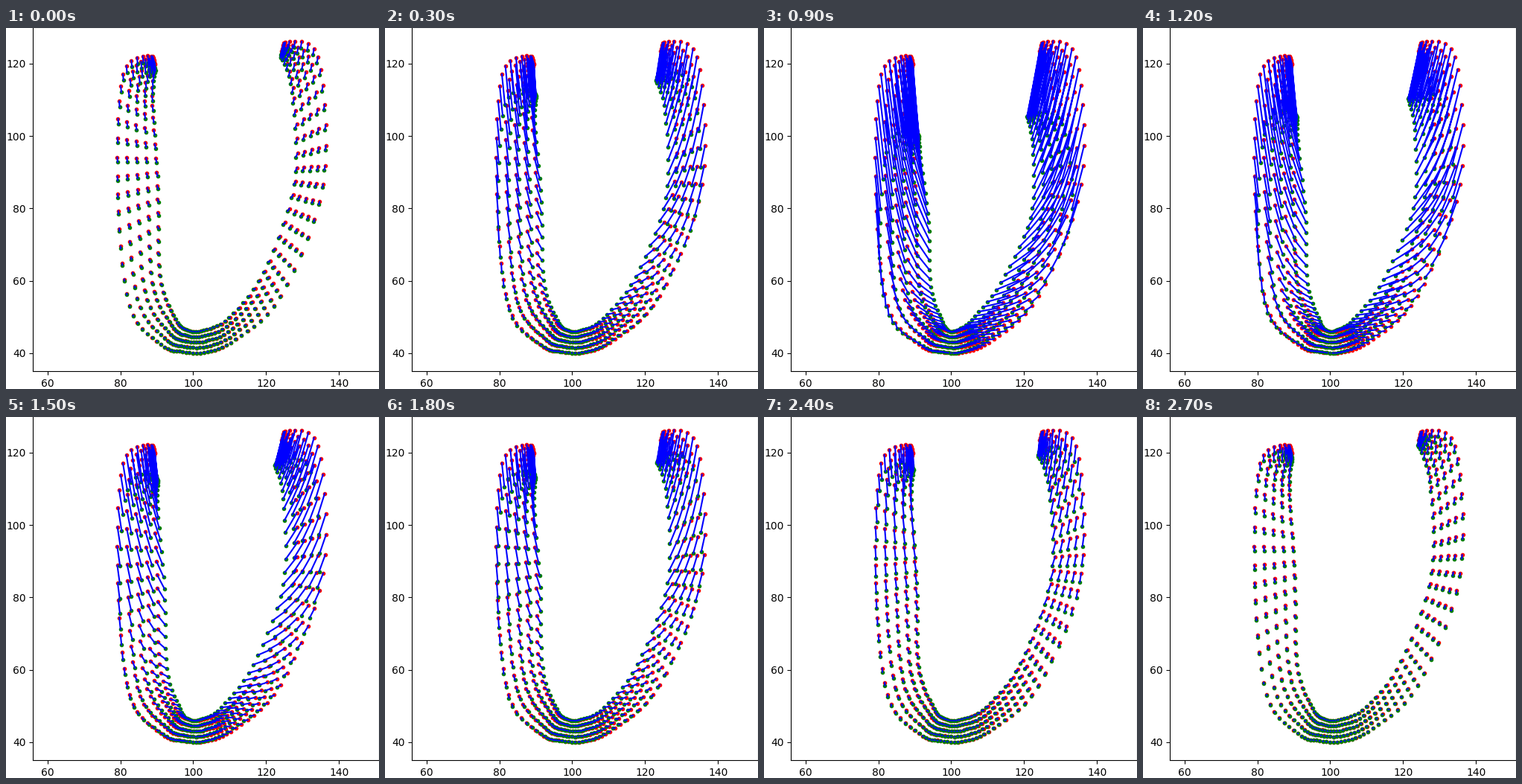
A matplotlib script that plays this animation: 501x485 px, repeating every 2850 ms.

```python
import numpy as np
import matplotlib.pyplot as plt
from matplotlib.animation import FuncAnimation

W, H, DPI = 501, 485, 100
FRAMES, INTERVAL = 19, 150
LAYERS, COLUMNS, APEX = 5, 78, 38
LEFT, BOTTOM, WIDTH, HEIGHT = 36.1, 23.75, 465, 462  # axes box in pixels
XLIM, YLIM = (56, 151), (35, 130)


def spline(knots, values, at):
    """Smooth curve through the values that comes to rest at both ends."""
    knots, values = np.asarray(knots, float), np.asarray(values, float)
    slopes = np.gradient(values, knots, axis=0)
    slopes[[0, -1]] = 0
    at = np.atleast_1d(at)
    k = np.clip(np.searchsorted(knots, at, side="right") - 1, 0, len(knots) - 2)
    step = (knots[k + 1] - knots[k])[:, None]
    u = (at - knots[k])[:, None] / step
    return ((1 + 2 * u) * (1 - u) ** 2 * values[k]
            + u * (1 - u) ** 2 * step * slopes[k]
            + u ** 2 * (3 - 2 * u) * values[k + 1]
            + u ** 2 * (u - 1) * step * slopes[k + 1])


def contour(points):
    """Columns along a contour given by evenly spaced key points."""
    return spline(np.linspace(0, COLUMNS - 1, len(points)), points, np.arange(COLUMNS))


def pull(u, drift, bulge, ripple, drop, middle, softness):
    """Shift at full contraction; u runs from 0 at the apex to 1 at the tip."""
    dx = drift * u + bulge * np.sin(np.pi * u) + ripple * np.sin(3 * np.pi * u)
    dy = drop / (1 + np.exp((middle - u) / softness))
    return np.column_stack([dx, dy])


def through_wall(outer, inner):
    """Evenly spaced layers from the outer to the inner contour."""
    depth = np.linspace(0, 1, LAYERS)[:, None, None]
    return ((1 - depth) * outer + depth * inner).reshape(-1, 2)


def to_data(pixels):
    x = XLIM[0] + (pixels[:, 0] - LEFT) * (XLIM[1] - XLIM[0]) / WIDTH
    y = YLIM[0] + (H - BOTTOM - pixels[:, 1]) * (YLIM[1] - YLIM[0]) / HEIGHT
    return x, y


# Wall at rest, in stage pixels, from the left tip round to the right tip.
OUTER = [(197, 38), (157, 62), (150, 223), (166, 373), (208, 425), (237, 435),
         (271, 435), (309, 418), (369, 360), (426, 210), (419, 39), (373, 20)]
INNER = [(200, 48), (196, 91), (203, 212), (206, 332), (227, 391), (244, 406),
         (266, 406), (301, 389), (348, 327), (389, 206), (386, 80), (370, 31)]

# Phase of the beat, then sideways and lengthwise contraction.
BEAT = np.array([(0, 0, 0), (0.05, 0.08, 0.09), (0.15, 0.38, 0.445),
                 (0.35, 1, 1), (0.55, 0.54, 0.385), (0.7, 0.22, 0.335),
                 (0.85, 0.13, 0.235), (0.95, 0.05, 0.085), (1, 0, 0)])

columns = np.arange(COLUMNS)
left_arm = 1 - columns[:APEX] / APEX
right_arm = (columns[APEX:] - APEX) / (COLUMNS - 1 - APEX)
outer_pull = np.vstack([pull(left_arm, 7, 2, 4, 103, 0.62, 0.09),
                        pull(right_arm, -16, -5, -3, 98, 0.64, 0.075)])
inner_pull = np.vstack([pull(left_arm, 7, 15, 0, 101, 0.64, 0.115),
                        pull(right_arm, -16, -23, 0, 89, 0.62, 0.1)])
rest = through_wall(contour(OUTER), contour(INNER))
shift = through_wall(outer_pull, inner_pull)
rest_x, rest_y = to_data(rest)
gap = np.full(len(rest), np.nan)

# The small excess keeps the float product from rounding below whole pixels.
fig = plt.figure(figsize=((W + 1e-6) / DPI, (H + 1e-6) / DPI), dpi=DPI)
ax = fig.add_axes([LEFT / W, BOTTOM / H, WIDTH / W, HEIGHT / H])
ax.set(xlim=XLIM, ylim=YLIM)
ax.plot(rest_x, rest_y, "r.")
moved, = ax.plot([], [], "g.")
links, = ax.plot([], [], "b-")


def update(frame):
    phase = (frame + 1) / (FRAMES + 1)
    x, y = to_data(rest + shift * spline(BEAT[:, 0], BEAT[:, 1:], phase))
    moved.set_data(x, y)
    links.set_data(np.column_stack([rest_x, x, gap]).ravel(),
                   np.column_stack([rest_y, y, gap]).ravel())
    return moved, links


animation = FuncAnimation(fig, update, frames=FRAMES, interval=INTERVAL, repeat=True)
plt.show()
```
